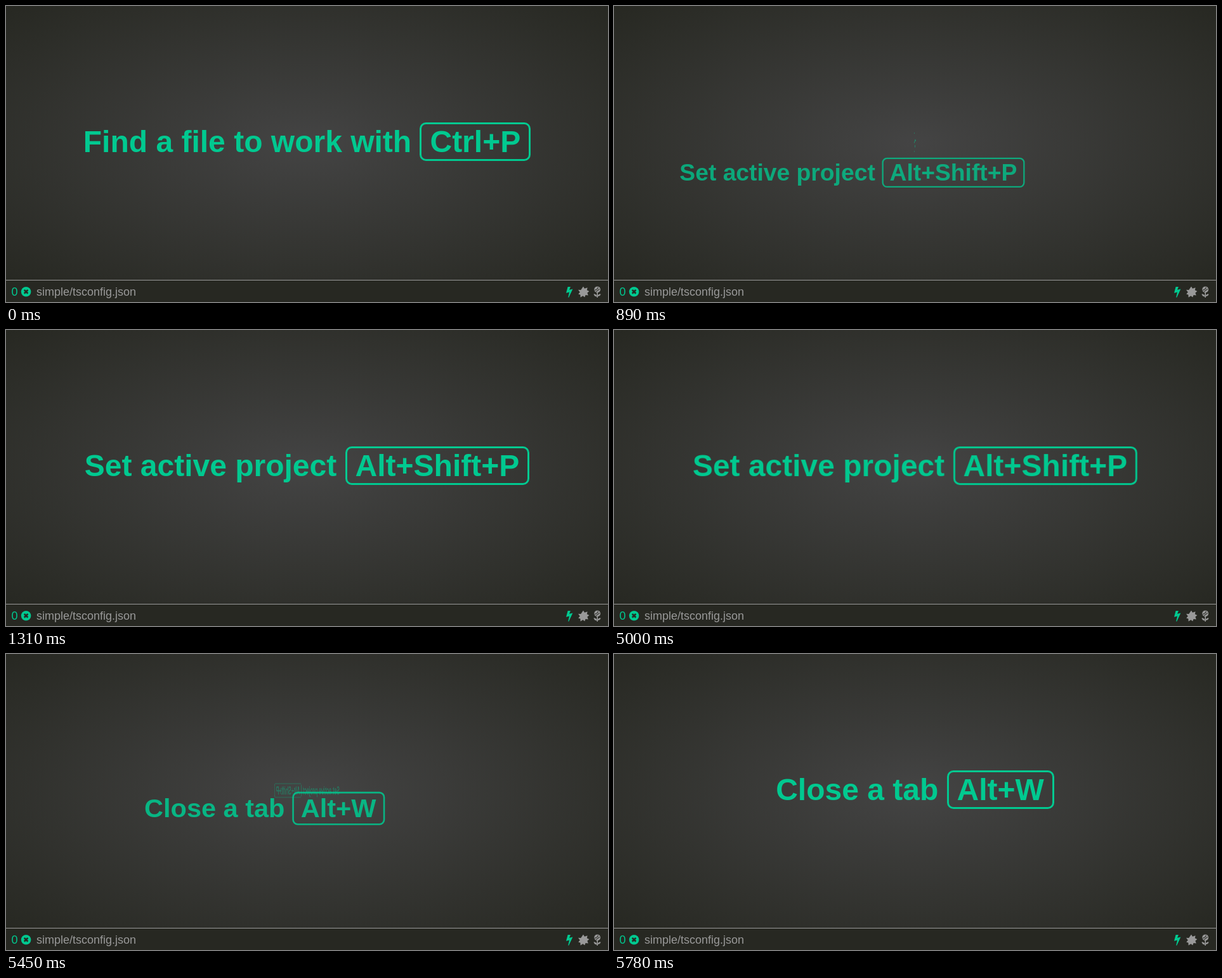
These frames come from a looping animation (949x468 px, 8000 ms). An HTML page:

```html
<!DOCTYPE html>
<html lang="en">
<head>
<meta charset="utf-8">
<title>Editor tips</title>
<style>
  :root {
    --green: #00c990;
    --grey: #999;
    --dark: #272822;
  }
  html, body {
    margin: 0;
    width: 100%;
    height: 100%;
    overflow: hidden;
    background: var(--dark);
    font-family: "Liberation Sans", Arial, sans-serif;
  }
  .stage {
    position: relative;
    width: 949px;
    height: 468px;
    overflow: hidden;
  }
  .tips {
    position: absolute;
    inset: 0 0 35px;
    overflow: hidden;
    background: radial-gradient(ellipse at center, #444, var(--dark));
  }
  .tip {
    position: absolute;
    inset: 0;
    padding-top: 188px;
    font-size: 48px;
    font-weight: bold;
    line-height: 53px;
    text-align: center;
    white-space: nowrap;
    color: var(--green);
    animation: 8s linear infinite both;
  }
  kbd {
    font: inherit;
    padding: 1px 13px;
    border: 3px solid;
    border-radius: 10px;
  }

  /* Tips swoop in from the lower left and leave by flipping into a hole. */
  .first { animation-name: first; }
  .second { animation-name: second; }
  .third { animation-name: third; }

  @keyframes first {
    0%, 6.125% {
      opacity: 1;
      transform: scale(1) rotateY(0deg);
      animation-timing-function: ease-in-out;
    }
    16.125%, 100% {
      opacity: 0;
      transform: scale(0) rotateY(180deg);
    }
  }
  @keyframes second {
    0%, 6.6875% {
      opacity: 0;
      transform-origin: 50% 100%;
      transform: scale(0) rotateY(0deg) translateX(-60%);
      animation-timing-function: ease;
    }
    16.0625% {
      opacity: 1;
      transform-origin: 50% 100%;
      transform: scale(1) rotateY(0deg) translateX(0%);
    }
    62.375% {
      opacity: 1;
      transform-origin: 50% 50%;
      transform: scale(1) rotateY(0deg) translateX(0%);
      animation-timing-function: ease-in-out;
    }
    72.375%, 100% {
      opacity: 0;
      transform-origin: 50% 50%;
      transform: scale(0) rotateY(180deg) translateX(0%);
    }
  }
  @keyframes third {
    0%, 62.7875% {
      opacity: 0;
      transform-origin: 50% 100%;
      transform: scale(0) translateX(-60%);
      animation-timing-function: ease;
    }
    72.1625%, 100% {
      opacity: 1;
      transform-origin: 50% 100%;
      transform: scale(1) translateX(0%);
    }
  }

  .bar {
    position: absolute;
    inset: 433px 0 0;
    border-top: 1px solid var(--grey);
    background: var(--dark);
    font-size: 18px;
    line-height: 36px;
    color: var(--grey);
  }
  .bar span { position: absolute; top: 0; }
  .errors { left: 8.5px; color: var(--green); }
  .file { left: 48px; }
  .icons { position: absolute; left: 0; top: 0; }
</style>
</head>
<body>
<div class="stage">
  <div class="tips">
    <div class="tip first">Find a file to work with <kbd>Ctrl+P</kbd></div>
    <div class="tip second">Set active project <kbd>Alt+Shift+P</kbd></div>
    <div class="tip third">Close a tab <kbd>Alt+W</kbd></div>
  </div>
  <div class="bar">
    <span class="errors">0</span>
    <span class="file">simple/tsconfig.json</span>
  </div>
  <svg class="icons" width="949" height="468" fill="#999">
    <!-- error badge -->
    <circle cx="31.6" cy="451.7" r="7.8" fill="#00c990"/>
    <path d="M28.8 448.9l5.6 5.6m0-5.6l-5.6 5.6" stroke="#272822" stroke-width="2.6"/>
    <!-- bolt -->
    <path d="M885.6 444h4.3l-1.9 4.7 5.4-1.1-6.2 13.2h-1.1l1.9-8.3-5 1.2z" fill="#00c990"/>
    <!-- leaf -->
    <path d="M910 443.6l2 3.2 4.6-1.6-.8 4 3.6 1.8-3 2.4 1.4 4.2-4.2-.6-1.4 3.6-2.8-2.4-3.8 2.6-.2-4.2-3.2-1.2 2.6-3-2.8-3.6 4.2.2z"/>
    <!-- flower -->
    <circle cx="932.2" cy="448.3" r="4.9"/>
    <path d="M928.2 449.4l4.2-2.2 1-2.4m-3.4 6.8l6-4.2" fill="none" stroke="#272822" stroke-width="1.1"/>
    <path d="M931.4 452h1.6v9h-1.6z"/>
    <path d="M932 459.4q-4.8.2-5.6-4.2 4.6.2 5.6 4.2zm.4-.4q.6-3.6 5.2-3.8-.8 4-5.2 3.8z"/>
  </svg>
</div>
</body>
</html>
```
